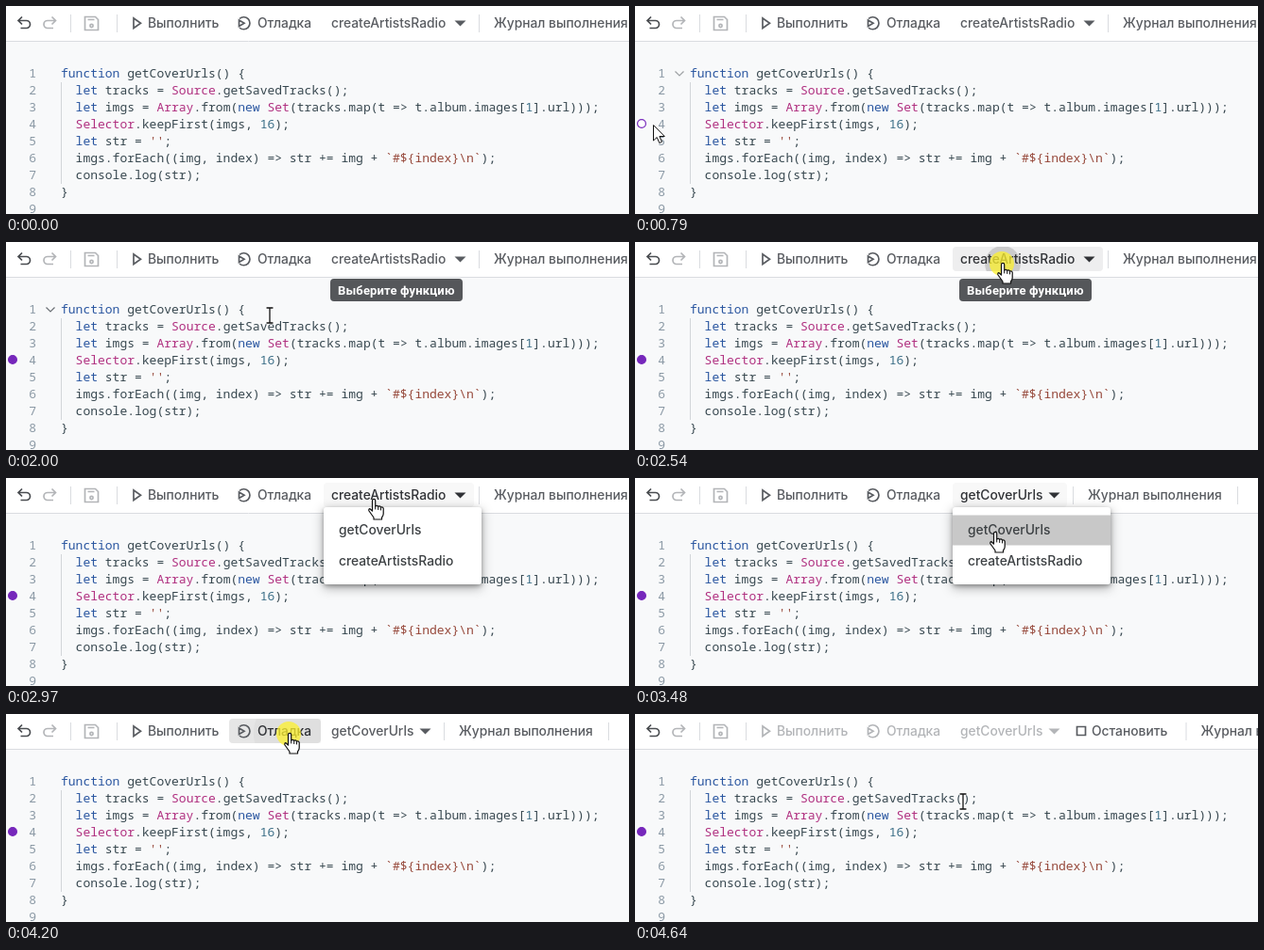
Recreate the animation shown at these times as an HTML page. Size 659x221 px, loop 4680 ms.

```html
<!DOCTYPE html>
<html lang="ru">
<head>
<meta charset="utf-8">
<style>
  html, body { margin: 0; width: 100%; height: 100%; overflow: hidden; background: #fff; }
  svg { display: block; }
  .ui { font: 500 13.8px Inter, sans-serif; fill: #595c61; }
  .code text { font: 13px "Noto Sans Mono", monospace; white-space: pre; fill: #37474f; }
  .code .num { fill: #8b99a5; text-anchor: end; }
  .code .keyword { fill: #2a56a0; }
  .code .type { fill: #b03080; }
  .code .string { fill: #96483a; }
  .code .digit { fill: #3a6d86; }
  .line { fill: none; stroke-width: 1.7; }
  .sep { stroke: #dadce0; }
  .off { fill: #b3b5b8; }
  .off .line { stroke: #b3b5b8; }
  #menu { fill: #3c4043; }
  #menu rect:first-child { filter: drop-shadow(0 2px 2px #0004) drop-shadow(0 3px 6px #0005); }
</style>
</head>
<body>
<svg id="stage" width="659" height="221" viewBox="0 0 659 221">
  <rect width="659" height="221" fill="#f8f9fa"/>
  <rect width="659" height="38" fill="#fff"/>
  <path class="sep" d="M0 37.5H659"/>

  <g class="code">
    <path d="M58.5 81V189" stroke="#d3d6d9"/>
    <g id="lines"></g>
  </g>
  <path id="fold" class="line" style="stroke-width:1.2" stroke="#6b7075" d="M42.5 69.5l4.5 4.5 4.5-4.5"/>
  <circle id="point" cx="7" cy="125" r="4.4" stroke="#7627bb" stroke-width="1.2"/>

  <svg id="debugBack" x="236" y="5" width="97" height="26">
    <rect width="100%" height="100%" rx="4" fill="#e6e6e6"/>
    <circle id="debugRipple" cx="64" cy="15" opacity=".03"/>
  </svg>
  <svg id="pickBack" x="336" y="5" width="159" height="26">
    <rect id="pickFill" width="100%" height="100%" rx="4"/>
    <circle id="pickRipple" cx="53" cy="18" opacity=".15"/>
  </svg>

  <g class="ui">
    <path class="line" stroke="#4a4d51" d="M17 11.5l-4 4 4 4M13.5 15.5h8a4 4 0 0 1 0 8h-6"/>
    <path class="line" stroke="#b3b5b8" d="M48.5 11.5l4 4-4 4M52 15.5h-8a4 4 0 0 0 0 8h6"/>
    <g class="line" stroke="#b3b5b8">
      <path d="M83.5 11.5h11l3 3v11h-14zM86.5 14.5h7"/>
      <circle cx="90.5" cy="21" r="1.6"/>
    </g>
    <path class="sep" d="M68.5 9V28M117.5 9V28"/>
    <g id="actions">
      <path class="line" stroke="#595c61" d="M135 13v10.500l7.500-5.250z"/>
      <text x="150" y="23">Выполнить</text>
      <g id="debug">
        <path class="line" stroke="#595c61" d="M247 13.500a6.500 6.500 0 1 1 0 9.500M246.500 15v6.500l5.500-3.250z"/>
        <text x="266" y="23">Отладка</text>
      </g>
      <text id="pick" x="344" y="23"></text>
      <path id="caret" d="M474.500 15.500h12l-6 6z"/>
    </g>
    <g id="stop">
      <path class="line" stroke="#595c61" d="M467.500 13.500h9v9h-9z"/>
      <text x="483" y="23">Остановить</text>
    </g>
    <g id="log">
      <path class="sep" d="M500.500 9V28M674.500 9V28"/>
      <text x="516" y="23">Журнал выполнения</text>
    </g>
  </g>

  <g id="tip">
    <rect x="343" y="39" width="140" height="24" rx="4" fill="#55575a"/>
    <text x="351" y="55.500" style="font:700 13px Roboto,sans-serif;letter-spacing:.15px;fill:#fff">Выберите функцию</text>
  </g>
  <g id="menu" class="ui">
    <rect x="336" y="31" width="167" height="82" rx="3" fill="#fff"/>
    <rect id="choice" x="336" y="39.500" width="167" height="32" fill="#c8c8c8"/>
    <text x="352" y="60">getCoverUrls</text>
    <text x="352" y="93">createArtistsRadio</text>
  </g>

  <circle id="yellow" r="13" fill="#fcf02e" fill-opacity=".75"/>
  <g id="cursor" stroke-linejoin="round" stroke-linecap="round">
    <path id="arrow" fill="#fff" stroke="#111" d="M.5 0V16l3.700-3.500 2.600 6 2.700-1.200-2.600-5.800h5z"/>
    <g id="beam" fill="none">
      <path stroke="#fff" stroke-width="3" d="M-3-8h2.500l.5.500.5-.5H3M0-8V8M-3 8H3"/>
      <path stroke="#111" stroke-width="1.300" d="M-3-8H3M0-8V8M-3 8H3"/>
    </g>
    <g id="hand" transform="translate(0 1)">
      <path fill="#fff" stroke="#111" stroke-width="1.200" d="M-1.500 12V1a1.600 1.600 0 0 1 3.200 0V7q1.500-1.500 3 .3 1.700-1 2.800.7 2-.7 2.700 1.200V15q0 2-1.700 4v2H0v-2l-5-7q-.8-2 1-2.300z"/>
      <path fill="none" stroke="#111" d="M1.700 7v3M4.700 7.500V10.500M7.500 8.500V11"/>
    </g>
  </g>
</svg>
<script>
const LOOP = 4680;
const $ = id => document.getElementById(id);
const set = (id, attrs) => {
  for (const name in attrs) $(id).setAttribute(name, attrs[name]);
};
const show = (id, on) => { $(id).style.opacity = Number(on); };

const source = String.raw`function getCoverUrls() {
  let tracks = Source.getSavedTracks();
  let imgs = Array.from(new Set(tracks.map(t => t.album.images[1].url)));
  Selector.keepFirst(imgs, 16);
  let str = '';
  imgs.forEach((img, index) => str += img + ~#${'${index}'}\n~);
  console.log(str);
}
`.replace(/~/g, '`');

const tokens = /(?<string>`[^`]*`|'[^']*')|\b(?<keyword>function|let|new)\b|\b(?<type>Source|Array|Set|Selector)\b|\b(?<digit>\d+)\b/g;
const paint = line => line.replace(/>/g, '&gt;').replace(tokens, (word, ...rest) => {
  const groups = rest[rest.length - 1];
  const kind = Object.keys(groups).find(name => groups[name]);
  return `<tspan class="${kind}">${word}</tspan>`;
});
$('lines').innerHTML = source.split('\n').map((line, i) => {
  const y = 76 + 18 * i;
  return `<text class="num" x="32" y="${y}">${i + 1}</text><text x="58" y="${y}">${paint(line)}</text>`;
}).join('');

// Bursts of screen updates: first, last, count
const bursts = [
  [140, 650, 12], [690, 970, 6], [1120, 1390, 5], [1820, 2310, 12], [2360, 2870, 11],
  [2920, 3430, 10], [3480, 3970, 10], [4040, 4550, 9], [4580, 4640, 2]
];
// Pointer path: time, x, y
const path = [
  [140, 300, 216], [280, 225, 188], [460, 95, 148], [650, 32, 129],
  [740, 19, 127], [790, 15, 125], [1820, 15, 125], [1910, 130, 108],
  [1998, 279, 78], [2130, 360, 46], [2310, 391, 31], [2411, 389, 22],
  [2920, 389, 22], [3070, 383, 50], [3180, 381, 57], [3480, 381, 57],
  [3620, 368, 49], [3800, 317, 29], [3970, 300, 20], [4360, 300, 20],
  [4460, 318, 40], [4580, 350, 82], [4640, 347, 93]
];
const clicks = [[1150, 1300], [2470, 2640], [3180, 3340], [4060, 4250]];

const hold = t => {
  let held = 0;
  for (const [first, last, count] of bursts) {
    if (t < first) break;
    const step = (last - first) / (count - 1);
    held = first + Math.min(count - 1, Math.floor((t - first) / step + .05)) * step;
  }
  return held;
};
const ramp = (t, a, b) => Math.max(0, Math.min(1, (t - a) / (b - a)));
const within = (t, a, b) => t >= a && t < b;
const locate = t => {
  const i = path.findIndex(p => p[0] > t);
  if (i < 0) return path[path.length - 1].slice(1);
  if (i === 0) return path[0].slice(1);
  const [a, x, y] = path[i - 1], [b, nextX, nextY] = path[i];
  const k = ramp(t, a, b);
  return [x + (nextX - x) * k, y + (nextY - y) * k];
};
const ripple = (id, dt) => set(id, { r: dt < 0 ? 0 : 6 + .3 * dt });

function render(time) {
  const t = hold(time);
  const [x, y] = locate(t);
  const chosen = t >= 3290, running = t >= 4400;
  const menu = ramp(t, 2640, 2760) * (1 - ramp(t, 3500, 3650));
  const kind = menu > .3 || y < 36 ? 'hand' : x < 40 ? 'arrow' : 'beam';

  set('cursor', { transform: `translate(${Math.round(x)} ${Math.round(y)})` });
  show('cursor', t >= 140);
  for (const id of ['arrow', 'beam', 'hand']) show(id, id === kind);
  set('yellow', { cx: x - 1, cy: y + 1 });
  show('yellow', clicks.some(([a, b]) => within(t, a, b)));

  show('fold', ramp(t, 560, 850) * (1 - ramp(t, 2040, 2280)));
  show('point', t >= 690);
  set('point', { fill: t >= 1180 ? '#7627bb' : '#fff' });

  show('tip', ramp(t, 1900, 1980) * (1 - ramp(t, 2600, 2720)));
  show('menu', menu);
  show('choice', t >= 3020);

  const picking = within(t, 2360, 3640);
  show('pickBack', picking);
  set('pickBack', { width: chosen ? 121 : 159 });
  set('pickFill', { fill: menu > .3 ? '#f8f8f8' : '#eeeeef' });
  ripple('pickRipple', within(t, 2470, 2700) ? t - 2470 : -1);
  show('debugBack', ramp(t, 4030, 4040) * (1 - ramp(t, 4400, 4620)));
  ripple('debugRipple', t - 4060);

  const label = chosen ? 'getCoverUrls' : 'createArtistsRadio';
  if ($('pick').textContent !== label) $('pick').textContent = label;
  $('pick').style.fill = $('caret').style.fill = picking ? '#303236' : '';
  $('debug').style.fill = within(t, 4040, 4400) ? '#303236' : '';
  set('caret', { transform: `translate(${chosen ? -37 : 0} 0)` });
  set('actions', { class: running ? 'off' : '' });
  show('stop', running);
  set('log', { transform: `translate(${running ? 82.5 : chosen ? -37 : 0} 0)` });
}

function tick() {
  render(performance.now() % LOOP);
  requestAnimationFrame(tick);
}
render(0);
tick();
</script>
</body>
</html>
```
